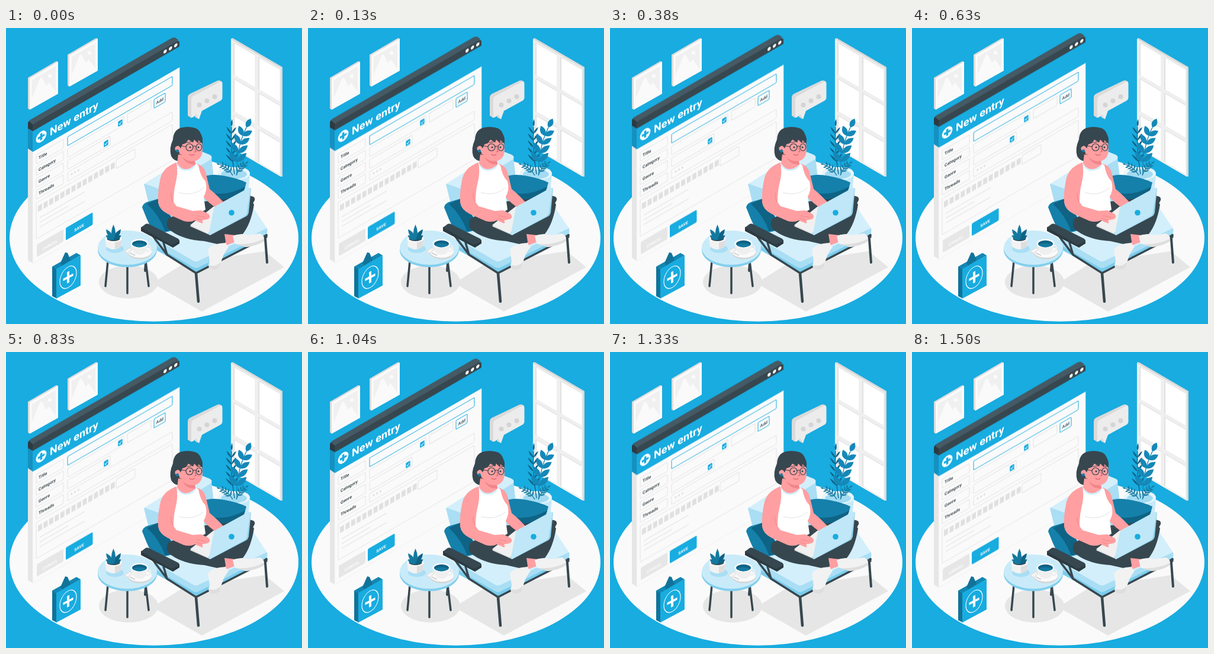
An HTML page for the animation above (1.54 s loop, 500 by 500 pixels).

```html
<!DOCTYPE html>
<html lang="en">
<head>
<meta charset="utf-8">
<title>New entry</title>
<style>
  html, body { margin: 0; width: 100%; height: 100%; overflow: hidden; background: #18ace0; }
  svg { display: block; width: 100vw; height: 100vh; }
  text { font-family: Roboto, "Open Sans", sans-serif; font-weight: 500; }
  .bold { font-weight: 700; }
  .float { animation: float 1540ms linear -40ms infinite; }
  @keyframes float { 50% { transform: translateY(-9px); } }
  .blue { fill: #18ace0; } .deep { fill: #15799f; } .dark { fill: #37474f; }
  .skin { fill: #ff9fa1; } .shade { fill: #f0868a; }
  .pale { fill: #fafafa; } .mist { fill: #e6e6e6; }
  .ink { fill: none; stroke: #37474f; stroke-linecap: round; stroke-linejoin: round; }
  .box { fill: none; stroke: #dedede; stroke-width: .8; }
  .hot { stroke: #18ace0; stroke-width: 1; }
</style>
</head>
<body>
<svg viewBox="0 0 500 500">
  <rect class="blue" width="500" height="500"/>
  <ellipse class="pale" cx="250" cy="354.700" rx="244" ry="141"/>

  <!-- wall pictures -->
  <defs>
    <g id="pic">
      <path fill="#dcdcdc" d="M37 84L85 56 88 57V111L40 138 37 136Z"/>
      <path class="pale" d="M40 85L88 57V111L40 138Z"/>
      <path fill="#f0f0f0" d="M43.500 88L84 64.500V107.500L43.500 131Z"/>
      <path class="pale" d="M43.500 119L57 86Q59 81 62 86L68 98 71 94Q73 91 75 95L84 107.500 43.500 131Z"/>
      <circle class="pale" cx="74" cy="81" r="3.200"/>
    </g>
  </defs>
  <use href="#pic"/>
  <use href="#pic" x="67" y="-39"/>

  <!-- window -->
  <path fill="#dadada" d="M380 18L383 17 467 66V251L464 251 380 202Z"/>
  <path fill="#efefef" d="M380 19L464 67.500V251L380 202Z"/>
  <g id="panes" transform="matrix(1 .577 0 1 0 -222.700)"></g>

  <!-- form window -->
  <g class="float">
    <path class="mist" d="M37 198L45 203V398L37 393Z"/>
    <path fill="#1590bf" d="M37 168L45 173V209.500L37 204Z"/>
    <path fill="#455a64" d="M37 170V163Q37 158 41 155.500L279 18Q283 15.500 286 17L291 20.500 280 34 45 174Z"/>
    <path fill="#2c3a42" d="M37 170V163Q37 160 38.500 158L46 164 45 174.500Z"/>
    <g transform="matrix(1 -.577 0 1 0 26.400)">
      <path fill="#fafafa" stroke="#ececec" stroke-width=".6" d="M45 209H293V398H45Z"/>
      <path class="blue" d="M45 173H293V209.600H45Z"/>
      <path class="dark" d="M45 174.500V168Q45 163 50 163H288Q293 163 293 168V174.500Z"/>
      <g id="dots" fill="#fff"></g>
      <circle fill="#fff" cx="59.500" cy="192" r="8.900"/>
      <path class="blue" d="M57.700 186.300H61.300V190.200H65.200V193.800H61.300V197.700H57.700V193.800H53.800V190.200H57.700Z"/>
      <text class="bold" x="74" y="199.300" font-size="18" fill="#fff">New entry</text>
      <g id="form"></g>
      <rect class="mist" x="52" y="370" width="45" height="21" rx="2"/>
      <rect class="blue" x="101" y="370" width="45.500" height="21" rx="2"/>
      <g fill="#fff" text-anchor="middle" font-size="6.800">
        <text x="74.500" y="385.800">CANCEL</text>
        <text class="bold" x="123.500" y="385">SAVE</text>
      </g>
    </g>
  </g>

  <!-- speech bubble -->
  <path fill="#dadada" d="M307 118Q307 113 311 111L357 89Q361 87.500 365 91L332 130 326 154 320 151 318 148 313 152 307 148Z"/>
  <path fill="#ececec" d="M313 121Q313 116.500 317 114.500L361 91Q365.500 89 365.500 94V117Q365.500 121 362 123L331 140 326 154 321 146 317 150Q313 153 313 148Z"/>
  <g fill="#d4d4d4"><circle cx="326.500" cy="130" r="4"/><circle cx="339.500" cy="123" r="4"/><circle cx="352.500" cy="116" r="4"/></g>

  <!-- tall plant -->
  <path fill="#c5e9f8" d="M358 246Q359 236 385 235T412 246L407 300H363Z"/>
  <ellipse fill="#e6f6fc" cx="385" cy="246" rx="27" ry="11"/>
  <ellipse fill="#a3dbf2" cx="385" cy="247" rx="22" ry="8"/>
  <g id="plant"></g>

  <!-- floor shadows -->
  <path class="mist" d="M247 431L300 398 437 377 470 404 331 479Z"/>
  <ellipse class="mist" cx="207" cy="429" rx="50" ry="28"/>

  <!-- armchair -->
  <path class="ink" stroke-width="4" d="M238 372L235 410M438 356L441 396"/>
  <path fill="#a9def4" d="M233 264L322 208 347 218 354 280 300 335 242 300Z"/>
  <path fill="#d3effb" d="M234 263L318 210Q323 206 329 208L344 214Q350 217 346 222L262 273Z"/>
  <path fill="#1580aa" d="M329 253Q345 245 370 250T406 261Q402 282 387 297L350 304Z"/>
  <path fill="#0f6385" d="M340 275Q365 288 404 268Q400 284 386 298L352 304Z"/>
  <path class="dark" d="M408 282L418 285Q421 287 420 291L415 300 406 296Z"/>
  <path fill="#d3effb" d="M250 356L300 326 405 290 417 303 440 337Q445 343 439 349L326 400Q321 402 316 399Z"/>
  <path fill="#a9def4" d="M250 355L316 393Q321 396 326 393L441 338V350L326 409Q321 412 316 409L250 371Z"/>
  <path fill="#7accec" d="M250 366L316 404Q321 407 326 404L441 347V352L322 413 250 373Z"/>
  <path fill="#d3effb" d="M262 352L300 338 344 356 420 325 437 338 324 393Q320 395 316 392Z"/>
  <path fill="#1580aa" d="M230 303Q231 297 238 294L259 288 290 337Q270 350 247 342Q237 322 230 303Z"/>
  <path fill="#0f6385" d="M238 297L259 288 290 337 269 344Q259 316 238 297Z"/>
  <path class="ink" stroke-width="3.500" d="M247 350L272 383 321 414 440 353M272 383L266 362"/>
  <path class="ink" stroke-width="4.500" d="M321 414L325 462"/>
  <path class="ink" stroke-width="4" d="M433 355L440 350"/>
  <path fill="#2c3a42" d="M228 336L281 363 293 358V364L282 371 228 343Z"/>
  <path class="dark" d="M228 337L236 331Q239 330 242 331.500L291 356Q294 359 291 361L283 365Q280 366 277 365Z"/>

  <!-- woman -->
  <path class="dark" d="M274 322Q268 337 279 343Q300 358 335 360L366 367Q374 362 372 352L400 348Q414 330 419 298L409 285 380 288 335 293Z"/>
  <path class="skin" d="M369 348L387 350 388 361 372 367Z"/>
  <path fill="#f2f2f2" d="M383 351Q397 346 410 350L429 347Q437 350 436 359Q424 368 405 370L386 364Z"/>
  <path fill="#dedede" d="M388 365Q414 367 436 356V360Q424 368 405 370Z"/>
  <path fill="#f2f2f2" d="M370 363L376 370Q368 380 365 390L361 404Q354 411 345 407Q340 403 344 394L341 374Q349 364 370 363Z"/>
  <path fill="#dedede" d="M342 400Q354 405 363 395L361 404Q354 411 345 407Z"/>
  <path class="skin" d="M321 229Q335 232 338 247L344 272Q359 284 372 300L362 308Q343 298 330 281Z"/>
  <path fill="#fff" d="M287 227Q293 243 306 241Q319 240 321 229L325 232Q328 250 337 259Q341 273 334 285L337 307Q308 325 276 307Q276 284 272 264L274 239Z"/>
  <path fill="none" stroke="#e2e2e2" d="M292 278Q316 285 334 270"/>
  <g transform="translate(2 -.5)">
    <path class="dark" d="M300 168Q281 169 280 189Q273 204 277 217Q283 228 297 225L329 210Q333 177 319 170Q310 167 300 168Z"/>
    <path class="skin" d="M289 214L287 229Q299 248 318 231L315 218Z"/>
    <path class="shade" d="M296 218Q305 228 317 224L318 231Q302 232 296 218Z"/>
    <path class="skin" d="M289 188Q309 181 329 190L330 205Q330 221 318 225Q305 227 297 216L291 213Z"/>
    <circle class="skin" cx="289" cy="204" r="5.500"/>
    <circle class="deep" cx="287.500" cy="208" r="2.500"/>
    <path class="dark" d="M281 198Q279 171 302 168Q325 167 330 187L330 196 323 190 322 195 316 189 314 194 306 189 302 195 296 197 293 204Q289 196 284 202Z"/>
    <g class="ink" stroke-width="1.200">
      <circle cx="308" cy="202" r="6"/><ellipse cx="324" cy="202" rx="4.800" ry="6"/>
      <path d="M314 201Q317 199 319 201M302 201L291 199M304 194L311 193M321 193L327 194"/>
    </g>
    <circle class="dark" cx="309" cy="202" r="1.500"/><circle class="dark" cx="323" cy="202" r="1.500"/>
    <path fill="none" stroke="#d9606a" stroke-width="1.200" stroke-linecap="round" d="M317 203L319 209 316 210M308 214Q312 217 316 214"/>
  </g>

  <!-- laptop and near arm -->
  <path fill="#dadada" d="M311 335L347 305 407 284 345 350Z"/>
  <path fill="#f0f0f0" d="M311 333L350 302 407 283 343 348Z"/>
  <path class="skin" d="M288 227Q263 236 260 258Q256 276 257 295Q259 307 273 314L300 326Q311 329 319 325L331 330Q334 329 331 325L341 323Q347 320 342 314L330 308 315 309 288 301 283 294Q283 275 287 260Q291 244 288 227Z"/>
  <path fill="none" stroke="#f0868a" d="M283 294Q278 289 279 278M322 317L337 320M320 321L331 325"/>
  <path class="skin" d="M349 285Q364 289 372 299L362 305 350 301Z"/>
  <path fill="#90d2ec" d="M342 346Q341 349 345 350L406 318Q409 316 410 312L414 271 411 270Z"/>
  <path fill="#bfe7f7" d="M351 305Q352 302 355 300L410 270Q414 269 413 273L407 313Q406 316 403 318L346 349Q342 350 343 346Z"/>
  <circle class="blue" cx="381" cy="312" r="4.800"/>

  <!-- side table -->
  <path class="ink" stroke-width="3.500" d="M172 394L168 436M205 400L205 448M236 394L241 436"/>
  <path fill="#83cfed" d="M155 371V375A50 29 0 0 0 255 375V371Z"/>
  <ellipse fill="#c9ebf9" cx="205" cy="371" rx="50" ry="29"/>
  <ellipse fill="#a9def4" cx="184" cy="373" rx="15" ry="7"/>
  <path fill="#f2f2f2" d="M167.500 356H195.500L194 369Q181 379 169 369Z"/>
  <path fill="#dedede" d="M184 361L195.500 356 194 369Q189 373 184 374Z"/>
  <ellipse class="pale" cx="181.500" cy="356" rx="14" ry="6"/>
  <ellipse class="dark" cx="181.500" cy="356" rx="11" ry="4"/>
  <g id="succulent"></g>
  <ellipse fill="#d5d5d5" cx="226" cy="380" rx="20" ry="10.500"/>
  <ellipse class="pale" cx="226" cy="378" rx="20" ry="10"/>
  <path fill="#f4f4f4" stroke="#d5d5d5" d="M200 377L209 371 214 374 205 381Z"/>
  <path fill="none" stroke="#d5d5d5" stroke-width="2" d="M209 380L218 384"/>
  <circle cx="239" cy="372" r="5" fill="none" stroke="#efefef" stroke-width="2.500"/>
  <path fill="#efefef" d="M211 364Q212 382 225 383T240 364Z"/>
  <ellipse fill="#fff" cx="225.500" cy="364" rx="15" ry="7.500"/>
  <ellipse fill="#0f6385" cx="225.500" cy="364.500" rx="12.500" ry="5.700"/>
  <path class="deep" d="M214 366Q225 361 237 366Q225 375 214 366Z"/>

  <!-- plus tag -->
  <path fill="#12739a" d="M78 403L86 405V457L78 453Z"/>
  <path fill="#1387b3" d="M78 403L119 380 126 384 85 408Z"/>
  <path class="blue" d="M85 407L126 384V435L85 457Z"/>
  <path fill="#12739a" d="M92 397L100 379 104 380 109 392 95 401Z"/>
  <g transform="matrix(1 -.53 0 1 105 421)">
    <ellipse rx="14" ry="17.500" fill="none" stroke="#fff" stroke-width="1.100"/>
    <path fill="#fff" d="M-2 -9.500H2V-2H8.500V2H2V9.500H-2V2H-8.500V-2H-2Z"/>
  </g>
</svg>
<script>
  const NS = 'http://www.w3.org/2000/svg';
  const $ = id => document.getElementById(id);

  function add(parent, tag, attrs, text) {
    const el = document.createElementNS(NS, tag);
    for (const k in attrs) el.setAttribute(k, attrs[k]);
    if (text) el.textContent = text;
    parent.appendChild(el);
    return el;
  }

  // Window panes: three rows, two columns.
  for (const y of [26, 87, 149]) for (const x of [386, 428]) {
    add($('panes'), 'rect', { x: x - 1.5, y: y - 1, width: 36, height: 55, fill: '#dcdcdc' });
    add($('panes'), 'rect', { x, y, width: 34.5, height: 54, fill: '#fff' });
  }

  // Form fields, laid out flat; the parent skews them.
  const form = $('form');
  const box = (x, y, width, height = 15, hot = '') =>
    add(form, 'rect', { x, y, width, height, rx: 1.5, class: 'box ' + hot });
  const tick = (x, y) => {
    add(form, 'rect', { x: x - 3.7, y: y - 4.5, width: 7.4, height: 9, rx: 1, class: 'blue' });
    add(form, 'path', { d: `M${x - 2} ${y}l1.500 2 2.800 -3.500`, fill: 'none', stroke: '#fff' });
  };

  for (let i = 0; i < 3; i++)
    add($('dots'), 'circle', { cx: 268.8 + 9 * i, cy: 168.8, r: 2.8 });
  ['Title', 'Category', 'Genre', 'Threads'].forEach((label, i) => {
    box(51, 218 + 20 * i, 46);
    add(form, 'text', { x: 55, y: 228 + 20 * i, 'font-size': 7.2, fill: '#263238' }, label);
  });
  box(104, 218, 177, 15, 'hot');
  box(104, 238, 95);
  box(205, 238, 40);
  box(250, 239, 19, 15, 'hot');
  box(104, 258, 72);
  box(104, 278, 177);
  box(186, 304, 32);
  box(51, 299, 230, 61);
  tick(193, 246);
  tick(169, 266.5);
  add(form, 'text', { x: 253.5, y: 249.5, 'font-size': 7, fill: '#37474f' }, 'Add');
  for (let i = 0; i < 3; i++)
    add(form, 'circle', { cx: 111 + 5.7 * i, cy: 285, r: 1.5, fill: '#dcdcdc' });
  for (let i = 0; i < 14; i++)
    add(form, 'rect', { x: 54 + 9.45 * i, y: 306, width: 6.8, height: 10, fill: '#e0e0e0' });
  [[327, 76], [335, 48], [343, 76]].forEach(([y, w]) =>
    add(form, 'rect', { x: 57, y, width: w, height: 1, fill: '#dedede' }));

  // Leaf with its base at x,y; angle in degrees, 0 points right.
  const leaf = (parent, x, y, angle, len, wide, fill) =>
    add(parent, 'path', {
      d: `M0 0Q${len * .45} ${-wide} ${len} 0Q${len * .45} ${wide} 0 0Z`,
      transform: `translate(${x} ${y}) rotate(${angle})`, fill
    });

  // Curved stem a-b-c with n leaf pairs that shrink towards the tip.
  function branch([ax, ay], [bx, by], [cx, cy], n, len, wide, spread, color) {
    const g = $('plant');
    add(g, 'path', { d: `M${ax} ${ay}Q${bx} ${by} ${cx} ${cy}`, fill: 'none', stroke: color, 'stroke-width': 1.4 });
    for (let i = 0; i <= n; i++) {
      const t = .25 + .75 * i / n, u = 1 - t;
      const x = u * u * ax + 2 * u * t * bx + t * t * cx;
      const y = u * u * ay + 2 * u * t * by + t * t * cy;
      const dir = Math.atan2(u * (by - ay) + t * (cy - by), u * (bx - ax) + t * (cx - bx)) * 180 / Math.PI;
      const size = len * (1 - .3 * t);
      const turns = i === n ? [0] : [-spread, spread];
      for (const a of turns) leaf(g, x, y, dir + a, size, wide, color);
    }
  }
  branch([386, 247], [379, 205], [381, 167], 5, 19, 3, 36, '#0f6385');
  branch([390, 247], [388, 205], [406, 168], 4, 24, 9, 42, '#1588b8');
  branch([383, 249], [376, 236], [362, 231], 4, 10, 2.5, 50, '#15799f');
  branch([389, 249], [394, 235], [404, 229], 4, 10, 2.5, 50, '#15799f');

  [[-150, 15], [-30, 15], [-125, 22], [-55, 22], [-90, 26]].forEach(([a, len], i) =>
    leaf($('succulent'), 181.5, 358, a, len, 7, i % 2 ? '#0f6385' : '#15799f'));
</script>
</body>
</html>
```
